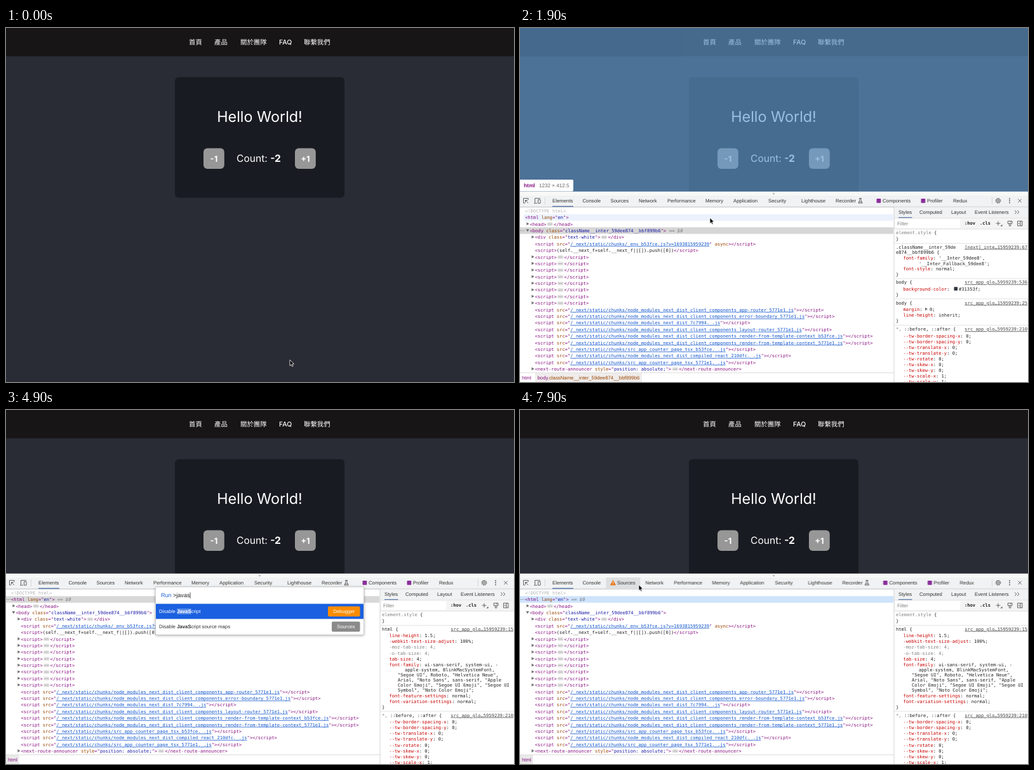
An HTML page that plays this animation: 800 px wide and 558 px high, repeating every 8 s.

```html
<!DOCTYPE html>
<html lang="zh-Hant">
<head>
<meta charset="utf-8">
<title>Counter with DevTools</title>
<style>
html, body { margin: 0; width: 100%; height: 100%; overflow: hidden; background: #292c35; }
svg { display: block; width: 800px; height: 558px; }
text { font: 7.79px "Liberation Sans", Arial, sans-serif; fill: #333; white-space: pre; text-rendering: geometricPrecision; }
.page { font-family: Inter, "Noto Sans CJK TC", "Noto Sans CJK JP", "Noto Sans CJK", sans-serif; fill: #fff; }
.nav { font-size: 10.4px; font-weight: 500; }
.title { font-size: 23.4px; }
.count { font-size: 15.6px; }
.btn { font-size: 13px; font-weight: 700; }
.mono { font-family: "DejaVu Sans Mono", monospace; font-size: 7.143px; fill: #222; }
.run { font-size: 9.09px; fill: #222; }
.mid { text-anchor: middle; }
.end { text-anchor: end; }
.b { font-weight: 700; }
.tag { fill: #881280; }
.attr { fill: #994500; }
.val { fill: #1a1aa6; }
.link { fill: #1155cc; text-decoration: underline; }
.src { fill: #444; text-decoration: underline; }
.prop { fill: #c80000; }
.gray { fill: #808080; }
.doc { fill: #b4b4b4; }
.it { fill: #777; font-style: italic; }
.white { fill: #fff; }
.blue { fill: #1a62d6; }
.hint { fill: #c8c8c8; }
.icon { fill: none; stroke: #555; stroke-width: .9; }
.tabs { animation: shift 8s step-end infinite; }
.cursor { animation: move 8s linear infinite; }
@keyframes shift { 0% { transform: none; } 70%, 100% { transform: translateX(10.4px); } }
@keyframes move {
  0% { transform: translate(447px, 523px); animation-timing-function: step-end; }
  1.25% { transform: translate(455px, 503px); animation-timing-function: step-end; }
  2.5%, 16.25% { transform: translate(464px, 484px); }
  18.75% { transform: translate(284px, 286.5px); }
  23.75% { transform: translate(299px, 299px); }
  28.75%, 77.5% { transform: translate(299.5px, 301.5px); }
  85% { transform: translate(137px, 276.5px); }
  98.75%, 100% { transform: translate(187px, 275.5px); }
}
</style>
</head>
<body>
<svg id="stage" viewBox="0 0 800 558"></svg>
<script>
const LOOP = 8000, OPEN = 1000, PICK = 2300, PALETTE = 2800, TYPE = 4000, ENTER = 5600;
const CH = 4.3, ROW = 10.39, SANS = 7.79;
let rules = '', spanCount = 0;

const esc = s => s.replace(/&/g, '&amp;').replace(/</g, '&lt;');
const span = (cls, s) => `<tspan class="${cls}">${esc(s)}</tspan>`;
const text = (x, y, body, cls = '') => `<text x="${x}" y="${y}" class="${cls}">${body}</text>`;
const mono = (x, y, body, cls = '') => text(x, y, body, 'mono ' + cls);
const rect = (x, y, w, h, fill, r = 0) => `<rect x="${x}" y="${y}" width="${w}" height="${h}" rx="${r}" fill="${fill}"/>`;
const path = (d, fill) => `<path d="${d}" fill="${fill}"/>`;
const icon = d => `<path class="icon" d="${d}"/>`;

// Shows its content only during the given [from, to] spans.
function during(spans, body) {
  const name = 'show' + spanCount++;
  const pct = t => t / LOOP * 100 + '%';
  rules += `@keyframes ${name}{0%{opacity:0}` + spans.map(([a, b]) =>
    `${pct(a)}{opacity:1}` + (b < LOOP ? `${pct(b)}{opacity:0}` : '')).join('') + '}';
  return `<g style="animation:${name} 8s step-end infinite">${body}</g>`;
}

function page() {
  const nav = [['首頁', 288], ['產品', 328], ['關於團隊', 369], ['FAQ', 430], ['聯繫我們', 469]];
  const button = (x, s) => rect(x, 189.5, 32.8, 32.6, '#979797', 6) + text(x + 16.4, 210.6, s, 'page btn mid');
  return rect(0, 0, 800, 558, '#292c35') + rect(0, 0, 800, 44.5, '#171516') +
    nav.map(([s, x]) => text(x, 25.7, s, 'page nav')).join('') +
    rect(266, 77.5, 267, 190, '#181b21', 6) +
    text(399.5, 148.4, 'Hello World!', 'page title mid') +
    button(311, '-1') + button(455, '+1') +
    text(363, 211.4, 'Count: ' + span('b', '-2'), 'page count');
}

const overlay = () => rect(0, 0, 800, 258, 'rgba(97,155,210,.63)') +
  rect(-3, 239, 87, 18.5, '#fff', 2) +
  `<text x="6" y="251" class="tag b" style="font-size:8.4px">html</text>` +
  `<text x="30" y="251" style="font-size:8.1px;fill:#666">1232 × 412.5</text>`;

function toolbar() {
  const label = ([s, x]) => text(x, 275.3, s);
  const moving = [['Sources', 142.5], ['Network', 187], ['Performance', 232], ['Memory', 292], ['Application', 336],
    ['Security', 391], ['Lighthouse', 443], ['Recorder', 497], ['Components', 571], ['Profiler', 641], ['Redux', 682]];
  return rect(0, 257.8, 800, 6.2, '#f8f8f8') + rect(0, 264, 800, 18, '#f1f2f3') + rect(0, 281.5, 800, .7, '#d0d0d0') +
    `<circle cx="399.5" cy="261" r="1.5" fill="#bbb"/>` +
    icon('M8 276H5.5V268.5H13V271M8.5 271.5L13 276M8.5 275V271.5H12') +
    icon('M23.5 275.5V268.5H32M22 276.2H27M28.5 270.5H32V276.2H28.5Z') +
    rect(39, 267, .7, 11, '#ccc') +
    during([[6700, LOOP]], rect(135.5, 264, 54, 17.5, '#dedfe0')) +
    during([[ENTER, LOOP]], path('M146.5 268L151 276.2H142Z', '#e8710a') + rect(146.1, 270.8, .9, 2.8, '#fff') + rect(146.1, 274.3, .9, .9, '#fff')) +
    label(['Elements', 51]) + label(['Console', 98.5]) + rect(51, 280.6, 33, 1.3, '#4a6b9f') +
    `<g class="tabs">${moving.map(label).join('')}` +
    rect(561.5, 269, 6.8, 6.8, '#8a2f9b', 1) + rect(631.5, 269, 6.8, 6.8, '#8a2f9b', 1) +
    icon('M534 268.5H538M535 268.5V271.5L532.8 276H539.2L537 271.5V268.5M534 274H538') + '</g>' +
    rect(743, 267, .7, 11, '#ccc') +
    `<circle cx="753" cy="272.3" r="3" class="icon"/><circle cx="753" cy="272.3" r="1.2" class="icon"/>` +
    `<circle cx="753" cy="272.3" r="4" class="icon" stroke-dasharray="1.6 1.54"/>` +
    [269.2, 272.3, 275.4].map(y => `<circle cx="771" cy="${y}" r=".95" fill="#555"/>`).join('') +
    icon('M784.3 269.6L789.7 275M789.7 269.6L784.3 275');
}

const baseline = i => 290.8 + ROW * i;
const rowBox = (i, fill, x = 0) => rect(x, 283 + ROW * i, 588 - x, ROW, fill, x ? 2 : 0);

function openTag(name, attr, value, cls = 'val', extra = '') {
  if (!attr) return span('tag', `<${name}>`);
  return span('tag', `<${name} `) + span('attr', attr) + span('tag', '="') + span(cls, value) +
    span('tag', '"') + span('attr', extra) + span('tag', '>');
}
const endTag = name => span('tag', `</${name}>`);

const arrow = (x, y, down) => path(down ? `M${x} ${y - 1.8}h5l-2.5 4z` : `M${x + .5} ${y - 2.4}v4.8l4 -2.4z`, '#6e6e6e');

function folded(i, x, name, attr, value) {
  const y = baseline(i), len = name.length + 2 + (attr ? attr.length + value.length + 4 : 0), end = x + len * CH;
  return arrow(x - 5.6, y - 2.9) + mono(x, y, openTag(name, attr, value)) +
    rect(end + 1, y - 5.4, 9.6, 5.8, '#e2e2e2', 2.5) +
    [3.6, 5.8, 8].map(d => rect(end + d - .5, y - 3, 1, 1, '#555', .5)).join('') +
    mono(end + 11.7, y, endTag(name));
}

function elements() {
  const lib = 'node_modules_next_dist_', client = lib + 'client_components_';
  const files = [client + 'app-router_5771e1.js', client + 'error-boundary_5771e1.js', lib + '7c7994._.js',
    client + 'layout-router_5771e1.js', client + 'render-from-template-context_b53fce.js',
    client + 'render-from-template-context_5771e1.js', 'src_app_counter_page_tsx_b53fce._.js',
    lib + 'compiled_react_210dfc._.js', 'src_app_counter_page_tsx_5771e1._.js'];
  const script = (i, file, extra) => mono(23.5, baseline(i),
    openTag('script', 'src', '/_next/static/chunks/' + file, 'link', extra) + endTag('script'));
  const mark = (i, x) => [1.5, 3.9, 6.3].map(d => rect(d - .6, baseline(i) - 3.3, 1.2, 1.2, '#666', .6)).join('') +
    mono(x, baseline(i), '== $0', 'it');
  const cls = 'className__inter_59dee874__bbf899b6';
  let out = rect(0, 282.2, 589, 276, '#fff') +
    during([[1400, 1700]], rowBox(0, '#ebf2fd', 6)) +
    during([[1700, PICK]], rowBox(1, '#ebf2fd', 6)) +
    during([[OPEN, PICK]], rowBox(3, '#d6d6d6') + mark(3, 235)) +
    during([[PICK, PALETTE], [ENTER, LOOP]], rowBox(1, '#cfe3fc')) +
    during([[PALETTE, ENTER]], rowBox(1, '#d8d8d8')) +
    during([[PICK, LOOP]], mark(1, 81)) +
    mono(8, baseline(0), esc('<!DOCTYPE html>'), 'doc') +
    mono(8, baseline(1), openTag('html', 'lang', 'en')) +
    folded(2, 15.5, 'head') +
    arrow(9.4, baseline(3) - 2.9, true) + mono(15.5, baseline(3), openTag('body', 'class', cls)) +
    folded(4, 23.5, 'div', 'class', 'text-white') +
    script(5, '_env_b53fce.js?v=1693815959239', ' async') +
    mono(23.5, baseline(6), openTag('script') + '(self.__next_f=self.__next_f||[]).push([0])' + endTag('script'));
  for (let i = 7; i < 15; i++) out += folded(i, 23.5, 'script');
  files.forEach((f, k) => out += script(15 + k, f));
  out += folded(24, 23.5, 'next-route-announcer', 'style', 'position: absolute;');
  // breadcrumbs
  return out + rect(0, 543.3, 589, 15, '#fff') + rect(0, 543, 589, .7, '#d0d0d0') +
    during([[OPEN, PICK]], rect(24, 544, 168, 14, '#efeceb') +
      text(27.5, 553.6, span('tag', 'body') + span('attr', '.' + cls))) +
    during([[PICK, LOOP]], rect(0, 544, 20.5, 14, '#e9e9e9')) +
    text(3, 553.6, 'html', 'tag');
}

const prop = (y, name, value) => mono(603.5, y + 2.6, span('prop', name) + ': ' + value + ';');
const head = (y, selector, src) => mono(592, y + 2.6, selector) + (src ? mono(799, y + 2.6, src, 'src end') : '');
const close = (y, line = 6.6) => mono(592, y + 2.6, '}') + rect(589.5, y + line, 211, .7, '#d8d8d8');

function tailwind(y) {
  const names = ['border-spacing-x', 'border-spacing-y', 'translate-x', 'translate-y', 'rotate', 'skew-x', 'skew-y', 'scale-x', 'scale-y'];
  return head(y, span('gray', '*, ') + '::before, ::after {', 'src_app_glo…5959239:210') +
    names.map((n, i) => prop(y + 10.5 + 9.1 * i, '--tw-' + n, n.startsWith('scale') ? 1 : 0)).join('');
}

const bodyStyles = () =>
  head(345, '.className__inter_59de', '[next]_inte…15959239:67') + head(353.3, 'e874__bbf899b6 {') +
  mono(603.5, 365.4, span('prop', 'font-family') + ": '__Inter_59dee8',") + mono(628, 373.6, "'__Inter_Fallback_59dee8';") +
  prop(379.4, 'font-style', 'normal') + close(388) +
  head(400.5, 'body {', 'src_app_glo…5959239:536') +
  mono(603.5, 413.6, span('prop', 'background-color') + ':') + rect(683.5, 408.2, 5.6, 5.6, '#31353f') + mono(691, 413.6, '#31353f;') +
  close(420) +
  head(433, 'body {', 'src_app_glo…15959239:25') +
  mono(603.5, 445.6, span('prop', 'margin') + ':') + arrow(637.5, 443) + mono(645, 445.6, '0;') +
  prop(452, 'line-height', 'inherit') + close(461.4) + tailwind(474.5);

function htmlStyles() {
  const fonts = ['"Segoe UI", Roboto, "Helvetica Neue",', 'Arial, "Noto Sans", sans-serif, "Apple',
    'Color Emoji", "Segoe UI Emoji", "Segoe UI', 'Symbol", "Noto Color Emoji";'];
  return head(345, 'html {', 'src_app_glo…15959239:15') +
    prop(355.5, 'line-height', '1.5') + prop(364.6, '-webkit-text-size-adjust', '100%') +
    mono(603.5, 376.4, '-moz-tab-size: 4;', 'gray') + mono(603.5, 385.5, '-o-tab-size: 4;', 'gray') +
    prop(392, 'tab-size', '4') +
    mono(603.5, 403.8, span('prop', 'font-family') + ': ui-sans-serif, system-ui, -') +
    mono(628, 412, 'apple-system, BlinkMacSystemFont,') +
    fonts.map((s, i) => mono(617, 420.1 + 8.12 * i, s)).join('') +
    prop(450.2, 'font-feature-settings', 'normal') + prop(459.3, 'font-variation-settings', 'normal') +
    close(468) + tailwind(481);
}

function sidebar() {
  const tabs = [['Styles', 596], ['Computed', 629], ['Layout', 679], ['Event Listeners', 716]];
  return rect(589, 282.2, 211, 276, '#fff') + rect(589, 282.2, 211, 17, '#f1f2f3') + rect(589, 299, 211, .7, '#d0d0d0') +
    tabs.map(([s, x]) => text(x, 293, s)).join('') + rect(596, 298.2, 21.5, 1.3, '#4a6b9f') +
    icon('M779 287.6L782 290.3L779 293M783 287.6L786 290.3L783 293') +
    rect(589, 299.7, 211, 17, '#f4f4f4') + rect(591, 301.2, 102, 14, '#fff') + rect(589, 316.6, 211, .7, '#d0d0d0') +
    text(594, 310.8, 'Filter', 'gray') + mono(700, 310.3, ':hov', 'b') + mono(724, 310.3, '.cls', 'b') +
    icon('M753 304.6V311.4M749.6 308H756.4') + path('M759.5 309.5V312.5H756.5Z', '#555') +
    icon('M768.2 304.4H775V308.2H768.2ZM770.4 308.2V312H772.8V308.2M772.8 304.4V306.3') +
    icon('M783.5 304.4H791V311.8H783.5ZM788.3 304.4V311.8M787 306.6L785.2 308.1L787 309.6') +
    head(322.2, span('gray', 'element.style') + ' {') + close(332, 7) +
    during([[OPEN, PICK]], bodyStyles()) + during([[PICK, LOOP]], htmlStyles()) +
    rect(588.6, 282, .8, 276, '#c8c8c8');
}

function item(i, body, badge, color, w) {
  const y = 305.5 + 24.05 * i;
  return (i ? rect(236, y, 327, .6, '#e6e6e6') : rect(236, y, 327, 24, '#1a60e0')) +
    text(241, y + 14.8, body, i ? '' : 'white') +
    rect(557.5 - w, y + 4, w, 16, color, 2) + text(557.5 - w / 2, y + 14.8, badge, 'white mid');
}

const box = h => `<rect x="235.5" y="279" width="328" height="${h}" rx="2" fill="#fff" stroke="#bbb" stroke-width=".5" style="filter:drop-shadow(0 1px 2px rgba(0,0,0,.35))"/>` +
  text(244, 295.2, 'Run', 'run blue');

function palette() {
  const panels = ['Application', 'CSS Overview', 'Console', 'Elements', 'Layers', 'Lighthouse', 'Media', 'Memory'];
  const all = box(219.5) + text(263, 295.2, '>' + span('hint', 'Command'), 'run') +
    panels.map((s, i) => item(i, 'Show ' + s, 'Panel', '#0cb0cc', 35.5)).join('') + rect(558.6, 306, 3, 8.5, '#26416f', 1.5);
  const word = 'JavaS', caret = [.222, .778, 1.278, 1.834, 2.334], mark = [.556, 1.112, 1.668, 2.224, 2.891];
  const at = n => n ? TYPE + 160 * n : PALETTE;
  let out = during([[PALETTE, at(1)]], all);
  for (let n = 1; n <= 5; n++) {
    const name = 'Disable ' + span('b', word.slice(0, n)) + 'JavaScript'.slice(n);
    out += during([[at(n), n < 5 ? at(n + 1) : ENTER]], box(75.3) +
      text(263, 295.2, '>' + word.slice(0, n).toLowerCase(), 'run') +
      rect(268.5 + caret[n - 1] * 9.09, 287.5, .7, 9.5, '#111') +
      item(0, '', 'Debugger', '#fb8c00', 50.5) +
      rect(269.1, 313, mark[n - 1] * SANS, 9, 'rgba(255,255,255,.28)') + text(241, 320.3, name, 'white') +
      item(1, name + ' source maps', 'Sources', '#8a8a8a', 44.5));
  }
  return out;
}

const cursor = () => during([[0, TYPE], [6200, LOOP]],
  `<path class="cursor" d="M0 0V9.4L2.1 7.4L3.5 10.6L5.1 9.9L3.7 6.8L6.6 6.6Z" stroke="#fff" stroke-width=".8" stroke-linejoin="round"/>`);

const art = page() + during([[1300, PALETTE]], overlay()) +
  during([[OPEN, LOOP]], elements() + sidebar() + toolbar()) + palette() + cursor();
const sheet = document.createElement('style');
sheet.textContent = rules;
document.head.append(sheet);
document.getElementById('stage').innerHTML = art;
</script>
</body>
</html>
```
